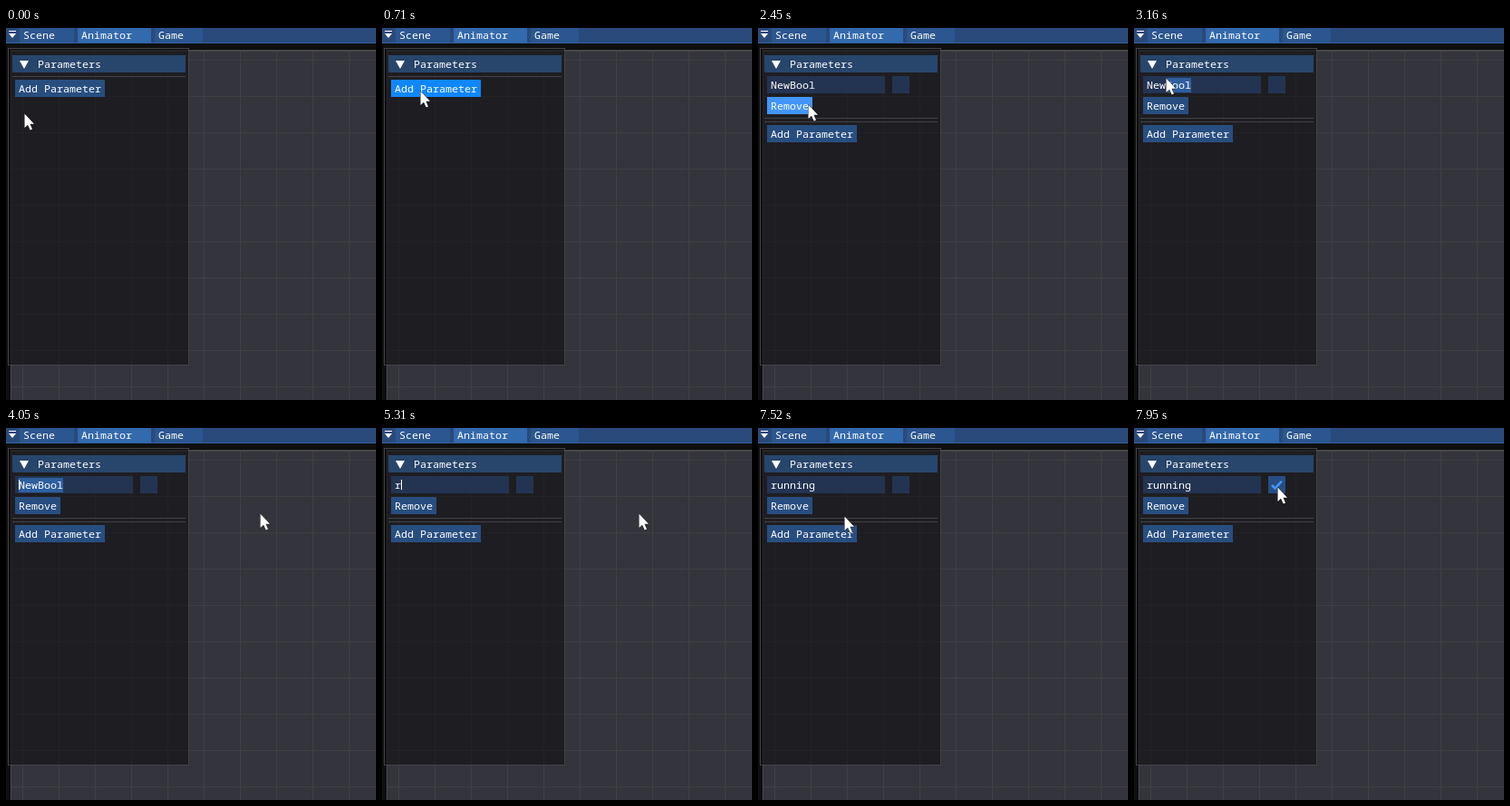
An HTML page with a canvas for the animation above (8 s loop, 408 by 410 pixels).

```html
<!DOCTYPE html>
<html>
<head>
<meta charset="utf-8">
<style>
html, body { margin: 0; width: 100%; height: 100%; overflow: hidden; background: #0f0f10; }
canvas { display: block; }
</style>
</head>
<body>
<canvas id="stage" width="408" height="410"></canvas>
<script>
const W = 408, H = 410, LOOP = 8000, STEP = 47;
const ctx = document.getElementById('stage').getContext('2d');
const CHAR = 7, ROW = 19, LEFT = 10, PAD = 4;
const BUTTON = '#284e80', HOVER = '#4296fa', ACTIVE = '#0f87fa';
const FRAME = '#233452', LINE = '#424248', BAR = '#294a7b';

// What the user does, in ms.
const PRESS_ADD = 710, OPEN_POPUP = 760, PRESS_ITEM = 1890, ADD = 1940;
const SELECT = 2990, SELECTED = 3250, TYPE = 5310, TYPE_PACE = 150, ENTER = 6390, CHECK = 7950;

// The pointer rests between glides; each starts where the last one ended.
const glides = [];
const glide = (start, end, x, y) => glides.push({ start, end, x, y });
glide(0, 0, 20, 94);
glide(40, 40, 6, 75);
glide(180, 380, 42, 69);
glide(990, 1090, 49, 76);
glide(1230, 1330, 57, 81);
glide(2410, 2450, 55, 84);
glide(2730, SELECT, 81, 62);
glide(SELECT, SELECTED, 0, 50);
glide(3580, 3770, 9, 56);
glide(3910, 4050, 280, 94);
glide(4190, 4190, 283, 94);
glide(7000, 7140, 174, 57);
glide(7190, 7480, 87, 101);
glide(7480, 7860, 158, 65);

const within = (t, a, b) => t >= a && t < b;
const clamp = (v, lo, hi) => Math.max(lo, Math.min(hi, v));

function pointerAt(t) {
  const i = glides.findLastIndex(g => g.start <= t);
  const to = glides[i], from = glides[Math.max(0, i - 1)];
  const steps = Math.round((to.end - to.start) / STEP) + 1;
  const done = t >= to.end ? 1 : (Math.floor((t - to.start) / STEP) + 1) / steps;
  const mix = k => Math.round(from[k] + (to[k] - from[k]) * Math.min(1, done));
  return { x: mix('x'), y: mix('y') };
}

function box(x, y, w, h, color) {
  ctx.fillStyle = color;
  ctx.fillRect(x, y, w, h);
}

function outlined(x, y, w, h, fill) {
  box(x, y, w, h, fill);
  ctx.strokeStyle = LINE;
  ctx.lineWidth = 1;
  ctx.strokeRect(x + .5, y + .5, w - 1, h - 1);
}

function text(s, x, y) {
  ctx.font = '11.667px "Noto Sans Mono", monospace';
  ctx.fillStyle = '#fff';
  ctx.fillText(s, x, y);
}

function triangle(x, y, w, h) {
  ctx.fillStyle = '#fff';
  ctx.fill(new Path2D(`M${x} ${y}h${w}l${-w / 2} ${h}z`));
}

function tab(label, x, w, color) {
  box(x, 0, w, 16, color);
  text(label, x + PAD, 12);
}

const separator = y => box(7, y, 191, 1, LINE);

function drawBackdrop() {
  box(0, 0, W, H, '#0f0f10');
  box(5, 24, W, H, '#34343c');
  for (let x = 18; x < W; x += 40) box(x, 24, 1, H, '#404043');
  for (let y = 35; y < H; y += 40) box(5, y, W, 1, '#404043');
  box(5, 24, W, 2, '#47474a');
  box(5, 24, 1, H, '#49465a');

  box(0, 0, W, 17, BAR);
  tab('Scene', 15, 60, '#2c568f');
  tab('Animator', 79, 81, '#3369ad');
  tab('Game', 164, 53, '#2c568f');
  box(0, 16, W, 1, '#3062a1');
  box(3, 3, 8, 1, '#fff');
  triangle(3, 6, 8, 5);

  outlined(2, 22, 200, 350, 'rgba(15,14,16,.6)');
  box(7, 30, 191, ROW, '#28466c');
  triangle(15, 36, 10, 9);
  text('Parameters', 35, 44);
}

function drawInput(t, pointer) {
  const x = LEFT + PAD, y = 53;
  const typed = clamp(Math.floor((t - TYPE) / TYPE_PACE) + 1, 0, 7);
  let caret = typed;
  box(LEFT, y, 130, ROW, FRAME);
  if (within(t, SELECT, TYPE)) {
    caret = t < SELECTED ? clamp(Math.round((pointer.x - x) / CHAR), 0, 7) : 0;
    box(x + caret * CHAR, y + 2, (7 - caret) * CHAR, 16, '#2e5f9e');
  }
  text(typed ? 'running'.slice(0, typed) : 'NewBool', x, y + 14);
  const blinkedOff = within(t, 4750, 5120);
  if (within(t, SELECT, ENTER) && !blinkedOff) box(x + caret * CHAR, y + 4, 1, 11, '#fff');
}

function drawCheckbox(t, hovered) {
  box(148, 53, ROW, ROW, hovered ? '#274e83' : FRAME);
  if (t < CHECK) return;
  ctx.strokeStyle = HOVER;
  ctx.lineWidth = 2.5;
  ctx.stroke(new Path2D('M152 63l3.5 3.5l7.5 -8'));
}

function drawPopup(t, pointer) {
  outlined(42, 69, 51, 63, '#141415');
  if (pointer.y >= 75) box(46, 75, 43, 17, t >= PRESS_ITEM ? HOVER : '#3a7ccd');
  ['bool', 'float', 'int'].forEach((name, i) => text(name, 50, 88 + 17 * i));
}

function drawPointer({ x, y }) {
  const arrow = new Path2D(`M${x + .5} ${y + .5}v15.5l3.5 -3.3l2.7 5.8l2.3 -1l-2.5 -5.7h4.5z`);
  ctx.strokeStyle = '#111';
  ctx.lineWidth = 1;
  ctx.stroke(arrow);
  ctx.fillStyle = '#fff';
  ctx.fill(arrow);
}

function draw(t) {
  const pointer = pointerAt(t);
  const popup = within(t, OPEN_POPUP, ADD), added = t >= ADD;
  const busy = popup || within(t, SELECT, 3910);
  const over = (x, y, w) =>
    !busy && within(pointer.x, x, x + w) && within(pointer.y, y, y + ROW);
  const button = (label, y, pressed) => {
    const w = label.length * CHAR + 2 * PAD;
    box(LEFT, y, w, ROW, pressed ? ACTIVE : over(LEFT, y, w) ? HOVER : BUTTON);
    text(label, LEFT + PAD, y + 14);
  };

  drawBackdrop();
  if (added) {
    drawInput(t, pointer);
    drawCheckbox(t, over(148, 53, ROW));
    button('Remove', 76);
    separator(99);
    separator(103);
  } else {
    separator(53);
  }
  button('Add Parameter', added ? 107 : 57, within(t, PRESS_ADD, OPEN_POPUP));
  if (popup) drawPopup(t, pointer);
  drawPointer(pointer);
}

function tick() {
  draw(performance.now() % LOOP);
  requestAnimationFrame(tick);
}
tick();
</script>
</body>
</html>
```
